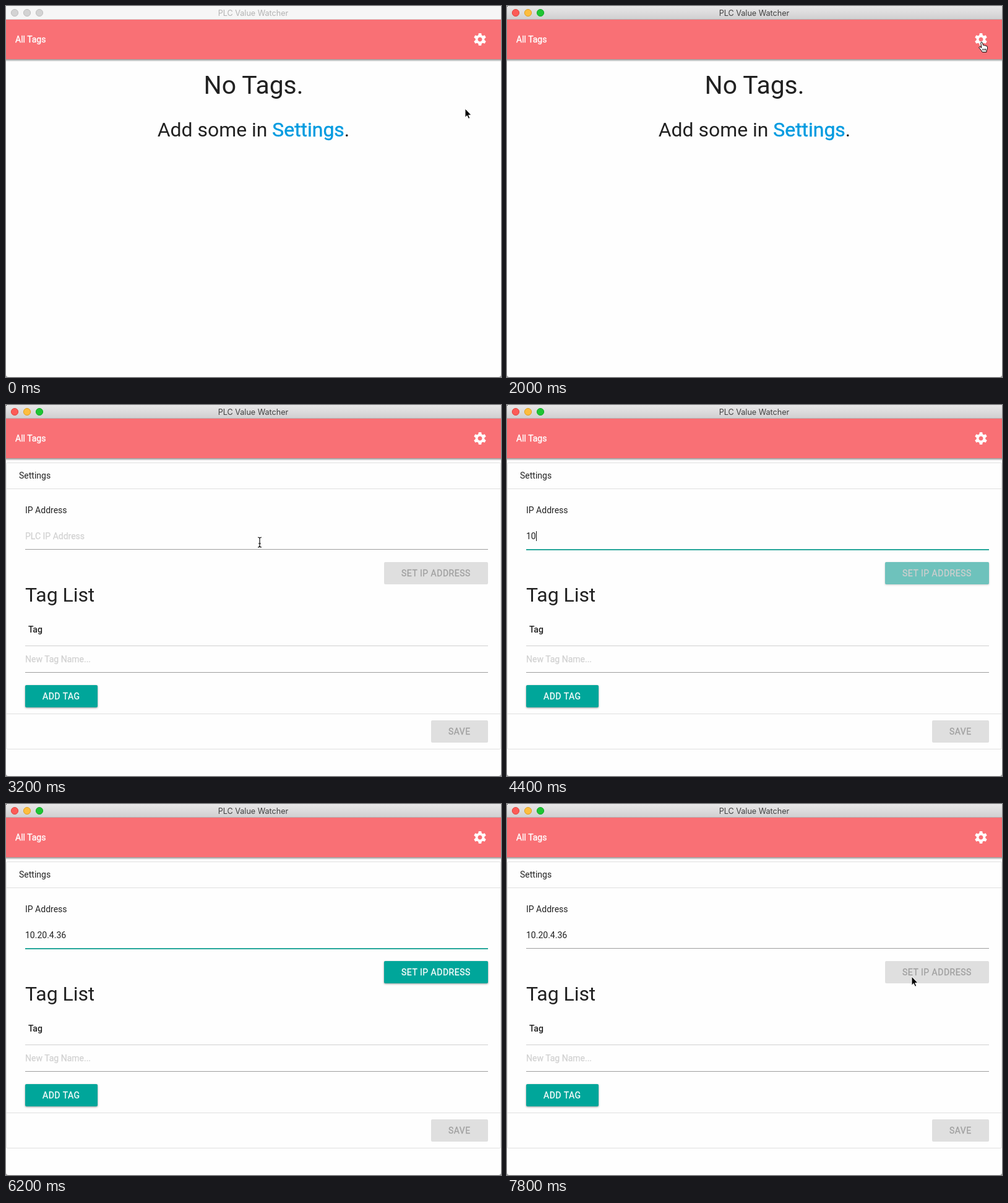
An HTML page that plays this animation: 800x600 px, repeating every 8 s.

```html
<!DOCTYPE html>
<html lang="en">
<head>
<meta charset="utf-8">
<title>PLC Value Watcher</title>
<style>
  html, body { margin: 0; width: 100%; height: 100%; overflow: hidden; background: #fefefe; }
  svg { display: block; width: 800px; height: 600px; }
  text { font: 14px Roboto, sans-serif; fill: #212121; }
  .heading { font-size: 40.88px; }
  .subheading { font-size: 31.92px; }
  .title { font: 12.6px Inter, sans-serif; }
  .mid { text-anchor: middle; }
  .link { fill: #039be0; stroke: #039be0; stroke-width: .5px; }
  .nav { fill: #fff; stroke: #fff; stroke-width: .35px; }
  .hint { fill: #d1d1d1; stroke: #d1d1d1; stroke-width: .25px; }
  .strong { font-weight: 500; }
  .label { letter-spacing: .5px; stroke-width: .3px; }
  .on rect { fill: #00a69a; filter: drop-shadow(0 1px 1.5px rgba(0, 0, 0, .4)); }
  .on text { fill: #fff; stroke: #fff; }
  .off rect { fill: #dfdfdf; }
  .off text { fill: #9f9f9f; stroke: #9f9f9f; }
  .card { fill: none; stroke: #e0e0e0; }
  .rule { stroke: #d0d0d0; }
  .field { stroke: #9e9e9e; }
  #pointer path { stroke-linejoin: round; }
</style>
</head>
<body>
<svg viewBox="0 0 800 600">
  <defs>
    <linearGradient id="chrome" x2="0" y2="1">
      <stop stop-color="#e8e7e8"/><stop offset="1" stop-color="#d0cfd0"/>
    </linearGradient>
    <linearGradient id="shade" x2="0" y2="1">
      <stop stop-opacity=".42"/><stop offset="1" stop-opacity="0"/>
    </linearGradient>
    <path id="tooth" d="M-2.9-6 -2.1-10H2.1L2.9-6z"/>
  </defs>
  <rect width="800" height="600" fill="#fefefe"/>

  <g id="empty">
    <text class="heading mid" x="400" y="142">No Tags.</text>
    <text class="subheading mid" x="400" y="211">Add some in <tspan class="link">Settings</tspan>.</text>
  </g>

  <g id="settings">
    <rect class="card" x=".5" y="93.5" width="799" height="463" rx="2"/>
    <path class="card" d="M1 135.5H799M1 499.5H799"/>
    <text x="21" y="119">Settings</text>
    <text x="31" y="175">IP Address</text>
    <text id="hint" class="hint" x="31" y="217">PLC IP Address</text>
    <text id="address" x="31" y="217"></text>
    <rect id="caret" y="204" width="1" height="16" fill="#111"/>
    <path class="field" d="M31 233.5H779"/>
    <rect id="focus" x="31" y="233" width="748" height="2" fill="#26a69a"/>
    <text class="subheading" x="31" y="318">Tag List</text>
    <text class="strong" x="36" y="368">Tag</text>
    <path class="rule" d="M31 389.5H779"/>
    <text class="hint" x="31" y="416">New Tag Name...</text>
    <path class="field" d="M31 432.5H779"/>
    <g id="buttons"></g>
  </g>

  <rect y="86" width="800" height="4" fill="url(#shade)"/>
  <rect y="22" width="800" height="64" fill="#f97075"/>
  <text class="nav" x="15" y="59">All Tags</text>
  <g transform="translate(766 54)" fill="#fff">
    <circle r="5.4" fill="none" stroke="#fff" stroke-width="3.8"/>
    <g id="teeth"></g>
  </g>

  <rect id="bar" width="800" height="22"/>
  <rect id="edge" y="21" width="800" height="1"/>
  <g id="lights"></g>
  <text id="title" class="title mid" x="399.5" y="16">PLC Value Watcher</text>
  <path d="M0 596V600H4Q0 600 0 596M800 596V600H796Q800 600 800 596" fill="#999"/>
  <rect id="corner" width="1" height="1" fill="#222"/>

  <g id="pointer">
    <path id="arrow" d="M0 0V14.3L3.2 11.3 5.5 16.3 7.8 15.3 5.6 10.4H10z" fill="#000" stroke="#fff"/>
    <path id="hand" d="M-1.3 1.2Q0-.6 1.3 1.2L2.5 5.6Q3.8 4.6 4.8 6 6.3 5.2 7.1 6.7 9.2 6.1 9.4 8.4V11.5L8 14V16.5H1.2L-.8 13.3-4 9.7Q-4.4 7.8-2.4 8.1L-.2 9.6z
      M2 11V14M4.3 11V14M6.5 11V14" fill="#fff" stroke="#000"/>
    <g id="beam" fill="none">
      <path d="M-3-8Q0-8 0-6V6Q0 8-3 8M3-8Q0-8 0-6V6Q0 8 3 8M-2 2H2" stroke="#fff" stroke-width="2.4"/>
      <path d="M-3-8Q0-8 0-6V6Q0 8-3 8M3-8Q0-8 0-6V6Q0 8 3 8M-2 2H2" stroke="#111" stroke-width="1.2"/>
    </g>
  </g>
</svg>
<script>
  const LOOP = 8000, STEP = 200;
  const ADDRESS = '10.20.4.36';
  const $ = id => document.getElementById(id);
  const show = (id, visible) => $(id).style.display = visible ? '' : 'none';
  const clamp = v => Math.max(0, Math.min(1, v));

  const button = (state, x, y, w, label, id = '') =>
    `<g class="${state}" id="${id}"><rect x="${x}" y="${y}" width="${w}" height="36" rx="2"/>` +
    `<text class="label" x="${x + 28}" y="${y + 23}">${label}</text></g>`;

  $('buttons').innerHTML =
    button('off', 611, 254, 168, 'SET IP ADDRESS') +
    button('on', 611, 254, 168, 'SET IP ADDRESS', 'ready') +
    button('on', 31, 453, 117, 'ADD TAG') +
    button('off', 687, 510, 92, 'SAVE');
  $('teeth').innerHTML = [0, 60, 120, 180, 240, 300]
    .map(a => `<use href="#tooth" transform="rotate(${a})"/>`).join('');
  $('lights').innerHTML = [14, 34, 54]
    .map(x => `<circle cx="${x}" cy="11" r="5.6"/>`).join('');

  const LIGHTS = [['#fc5b57', '#e2463f'], ['#fdbd3e', '#dfa023'], ['#1fc433', '#12ac28']];
  const IDLE = ['#d3d3d3', '#bfbfbf'];

  // time, x, y
  const TRACK = [
    [0, 742, 166], [800, 766, 62], [1000, 767, 58], [2200, 767, 58],
    [3000, 410, 222], [6400, 410, 222], [7000, 619, 275],
    [7200, 623, 277], [7400, 626, 278], [7800, 654, 279]
  ];
  // start time, pointer shape
  const SHAPES = [
    [0, 'arrow'], [1000, 'hand'], [2400, 'arrow'], [3000, 'beam'], [4200, ''],
    [6400, 'beam'], [6600, 'arrow'], [7000, 'hand'], [7600, 'arrow']
  ];

  function pointerAt(t) {
    const i = TRACK.findIndex(k => k[0] > t);
    if (i < 0) return TRACK[TRACK.length - 1].slice(1);
    const [t0, x0, y0] = TRACK[i - 1], [t1, x1, y1] = TRACK[i];
    const p = (t - t0) / (t1 - t0), e = p * p * (3 - 2 * p);
    return [x0 + (x1 - x0) * e, y0 + (y1 - y0) * e];
  }

  // rises over `up` ms from `start`, falls the same way from `end`
  const pulse = (t, start, end, up) => clamp((t - start) / up) * (1 - clamp((t - end) / up));

  function render(t) {
    const active = t >= 1000, page = t >= 2200;
    show('empty', !page);
    show('settings', page);
    show('corner', active);
    $('bar').setAttribute('fill', active ? 'url(#chrome)' : '#f6f6f6');
    $('edge').setAttribute('fill', active ? '#b5b1b3' : '#dadada');
    $('title').style.fill = active ? '#404040' : '#b2b2b2';
    [...$('lights').children].forEach((light, i) => {
      const [fill, stroke] = active ? LIGHTS[i] : IDLE;
      light.setAttribute('fill', fill);
      light.setAttribute('stroke', stroke);
    });

    const typed = t < 4200 ? 0 : t < 4400 ? 1 : Math.min(ADDRESS.length, 2 + Math.floor((t - 4400) / 150));
    $('address').textContent = ADDRESS.slice(0, typed);
    show('hint', !typed);
    $('focus').style.opacity = pulse(t, 3300, 7400, 300);
    $('ready').style.opacity = pulse(t, 4250, 7400, 300);

    const since = t < 4200 ? t - 3400 : t - 5600;
    const caretOn = t >= 3400 && t < 7400 && (since < 0 || since % 1000 < 500);
    show('caret', caretOn);
    if (caretOn) {
      const width = typed ? $('address').getComputedTextLength() : 0;
      $('caret').setAttribute('x', Math.round(31 + width));
    }

    const shape = SHAPES.filter(s => s[0] <= t).pop()[1];
    ['arrow', 'hand', 'beam'].forEach(name => show(name, name === shape));
    $('pointer').setAttribute('transform', `translate(${pointerAt(t).map(Math.round)})`);
  }

  const start = performance.now();
  function tick() {
    const t = (performance.now() - start) % LOOP;
    render(Math.floor(t / STEP) * STEP);
    requestAnimationFrame(tick);
  }
  render(0);
  requestAnimationFrame(tick);
</script>
</body>
</html>
```
